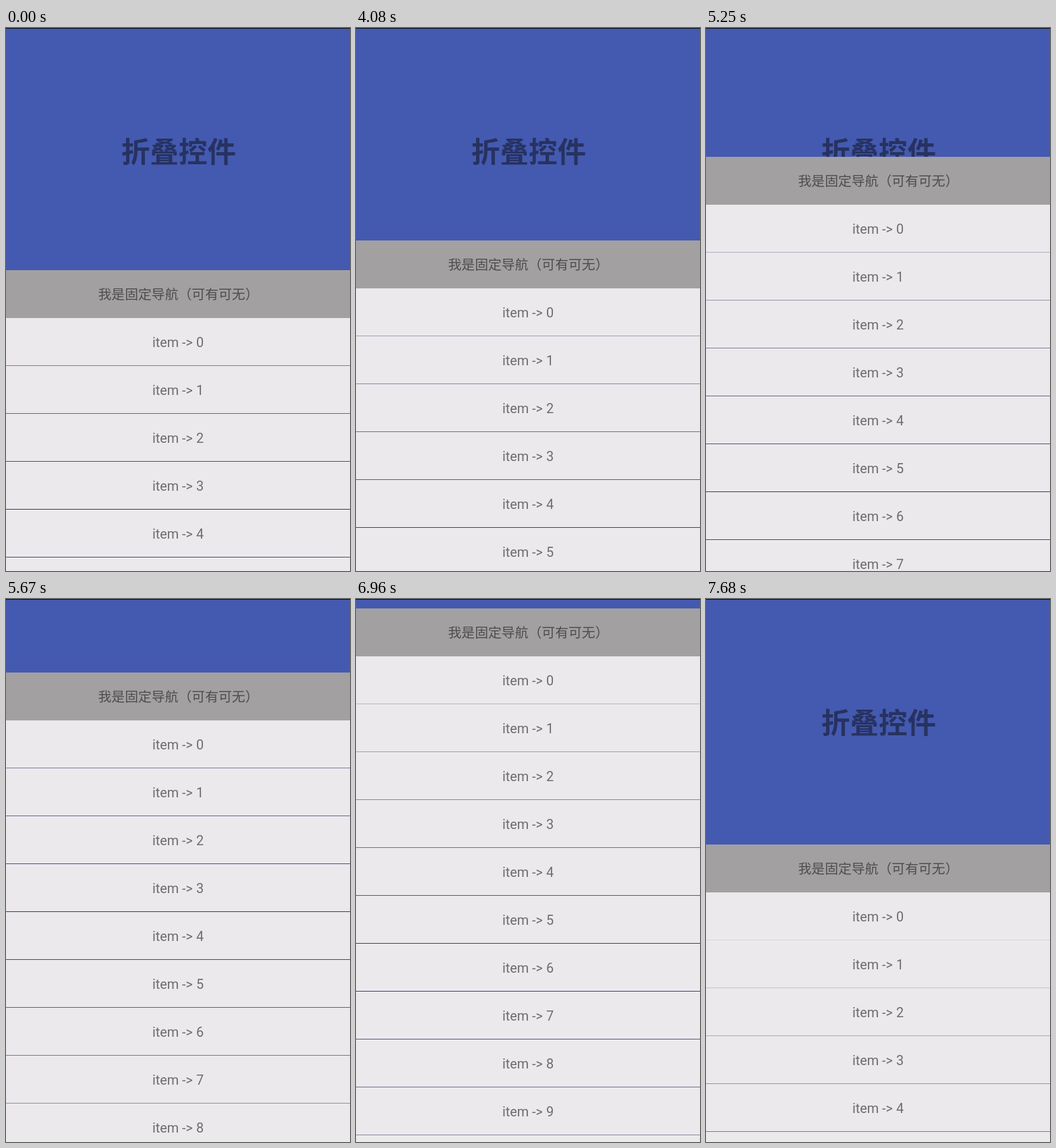
Recreate the animation shown at these times as an HTML page with a canvas. Size 510 px wide and 805 px high, loop 7.8 s.

```html
<!DOCTYPE html>
<html lang="zh">
<head>
<meta charset="utf-8">
<style>
  html, body { margin: 0; width: 100%; height: 100%; overflow: hidden; }
  canvas { display: block; }
</style>
</head>
<body>
<canvas id="stage" width="510" height="805"></canvas>
<script>
const W = 510, H = 805, LOOP = 7800, STEP = 30, ROW = 71;
const ctx = document.getElementById('stage').getContext('2d');
const CJK = '"Noto Sans CJK SC", "Noto Sans CJK", sans-serif';
const LATIN = 'Roboto, sans-serif';

// [time in ms, bottom edge of the header]
const keys = [
  [0, 359.2], [3480, 359.2], [3510, 358.27], [4590, 264.6], [5100, 210.4],
  [5250, 191.34], [5910, 62.4], [6120, 30.52], [6360, 11.3], [6930, 11.3],
  [7230, 166.26], [7680, 364.45], [7800, 364.45]
];

const slope = i => (keys[i + 1][1] - keys[i][1]) / (keys[i + 1][0] - keys[i][0]);

// Monotone tangent: harmonic mean of the neighbouring slopes
function tangent(i) {
  if (i === 0 || i === keys.length - 1) return 0;
  const a = slope(i - 1), b = slope(i);
  return a * b > 0 ? 2 * a * b / (a + b) : 0;
}

function headerEdge(t) {
  let i = 0;
  while (i < keys.length - 2 && t >= keys[i + 1][0]) i++;
  const [t0, y0] = keys[i], [t1, y1] = keys[i + 1];
  const d = t1 - t0, u = (t - t0) / d, v = 1 - u;
  return v * v * (1 + 2 * u) * y0 + u * u * (3 - 2 * u) * y1
    + d * u * v * (v * tangent(i) - u * tangent(i + 1));
}

function rect(color, y, h) {
  ctx.fillStyle = color;
  ctx.fillRect(0, y, W, h);
}

function label(text, x, y, font, color) {
  ctx.font = font;
  ctx.fillStyle = color;
  ctx.fillText(text, x, y);
}

// Dividers fade as they drift between pixel rows
function divider(edge, index) {
  const pos = edge + 141 - 0.065 * index;
  const row = Math.round(pos);
  ctx.globalAlpha = 1 - 2 * Math.abs(pos - row);
  rect('#343660', row + ROW * index, 1);
  ctx.globalAlpha = 1;
}

function draw(t) {
  const edge = headerEdge(t), y = Math.floor(edge);
  ctx.textAlign = 'center';
  ctx.textBaseline = 'alphabetic';

  rect('#445ab0', 0, H);
  label('折叠控件', 256, 199, `bold 42.5px ${CJK}`, '#273261');

  rect('#a2a0a1', y, ROW);
  label('我是固定导航（可有可无）', 255.5, y + 43, `19.83px ${CJK}`, '#4e4c4d');

  rect('#ece9ec', y + ROW, H);
  for (let i = 0; y + ROW * (i + 1) < H; i++) {
    label(`item -> ${i}`, 255, y + 114 + ROW * i, `19.83px ${LATIN}`, '#6e6c6e');
    divider(edge, i);
  }
  rect('#0c0c12', 0, 1);
}

const start = performance.now();
function frame() {
  const t = (performance.now() - start) % LOOP;
  draw(Math.floor(t / STEP) * STEP);
  requestAnimationFrame(frame);
}
frame();
</script>
</body>
</html>
```
